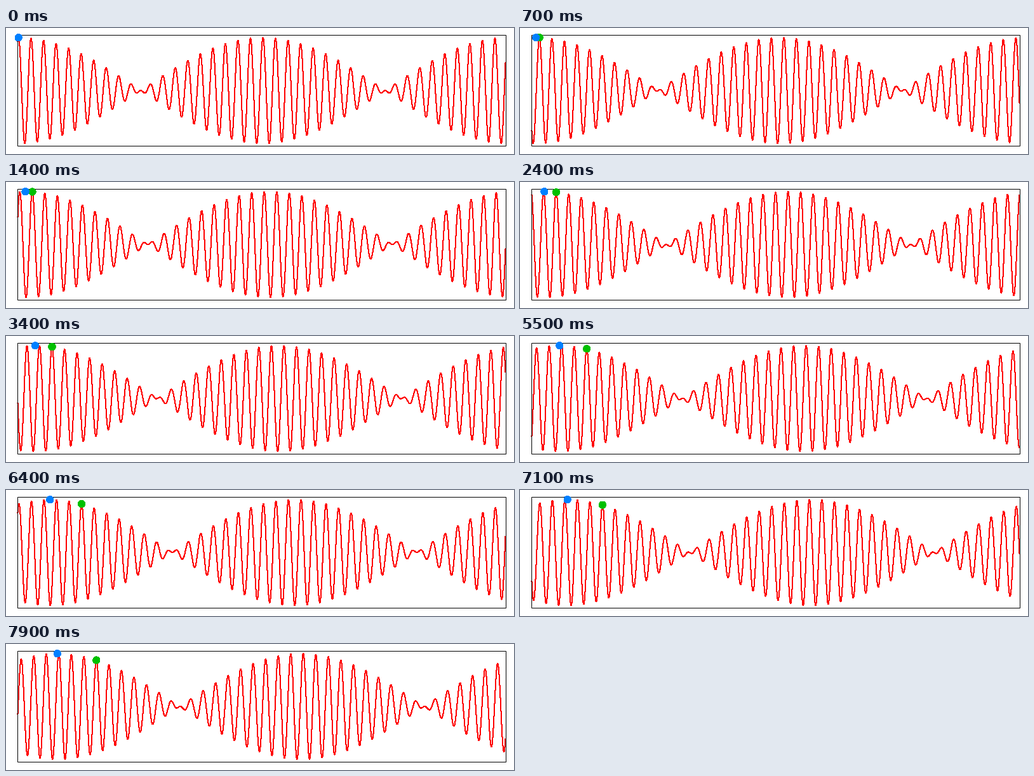
Recreate the animation shown at these times as a matplotlib script. Size 800 px wide and 200 px high, loop 8000 ms.

```python
import numpy as np
import matplotlib.pyplot as plt
from matplotlib.animation import FuncAnimation
from matplotlib.patches import Circle, Rectangle

W, H, DPI = 800, 200, 100
PX = 72 / DPI                      # one pixel in points
FRAMES, STEP_MS = 80, 100

LEFT, RIGHT, TOP, BOTTOM = 18, 787, 11, 187
START, MID, AMP = 19.7, 99.2, 84
SPAN = 770                         # one full envelope period
K_CARRIER = 2 * np.pi * 39 / SPAN
K_GROUP = 2 * np.pi / SPAN
V_PHASE, V_GROUP = 1.553, 0.774    # pixels per step

x = np.arange(LEFT + 0.5, RIGHT, 0.5)


def wave(x, n):
    carrier = np.cos(K_CARRIER * (x - START - V_PHASE * n))
    envelope = np.cos(K_GROUP * (x - START - V_GROUP * n))
    return MID - AMP * carrier * envelope


fig = plt.figure(figsize=(W / DPI, H / DPI), dpi=DPI, facecolor="white")
ax = fig.add_axes([0, 0, 1, 1])
ax.set_xlim(0, W)
ax.set_ylim(H, 0)
ax.axis("off")

# unsmoothed strokes fill every pixel they touch, so 1 px shows as 2
line, = ax.plot([], [], color="#ff0000", lw=PX, antialiased=False, zorder=1)
ax.add_patch(Rectangle((LEFT, TOP), RIGHT - LEFT, BOTTOM - TOP, fill=False,
                       ec="black", lw=PX, zorder=2))


def dot(color, z):
    return ax.add_patch(Circle((START, MID - AMP), 5.6, fc=color, ec="none",
                               antialiased=False, zorder=z))


crest = dot("#00c000", 3)
group = dot("#0080ff", 4)


def draw(n):
    line.set_data(x, wave(x, n))
    xc = START + V_PHASE * n
    crest.center = xc, wave(xc, n)
    group.center = START + V_GROUP * n, MID - AMP
    return line, crest, group


anim = FuncAnimation(fig, draw, frames=FRAMES, interval=STEP_MS,
                     repeat=True, repeat_delay=0)
plt.show()
```
